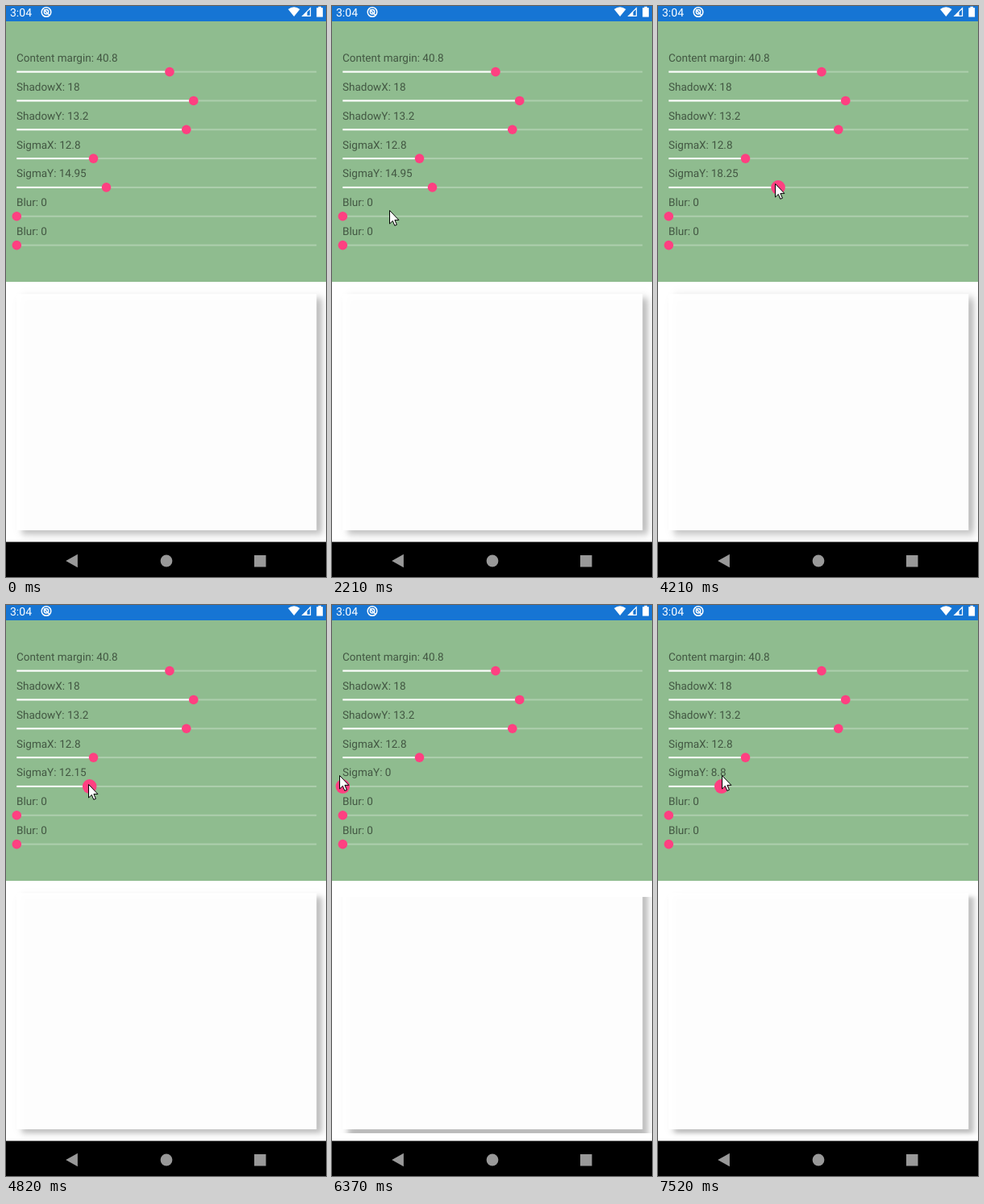
Animation, 397 px wide and 708 px high, one loop 8000 ms. Source, as an HTML page with a canvas:

```html
<!DOCTYPE html>
<html lang="en">
<head>
<meta charset="utf-8">
<title>Shadow settings</title>
<style>
html, body { margin: 0; width: 100%; height: 100%; overflow: hidden; background: #fff; }
canvas { display: block; }
</style>
</head>
<body>
<canvas id="stage" width="397" height="708"></canvas>
<script>
const ctx = document.getElementById('stage').getContext('2d');
const LOOP = 8000, TICK = 77.06, START = 424;
const LEFT = 13.3, RIGHT = 385.2, FIRST_ROW = 81.6, ROW = 35.83;
const PINK = '#ff4081', GREEN = '#8fbc8f', BLUE = '#1675d4', GRAY = '#999';
const CARD = { x: 13.1, y: 357.1, r: 385.3, b: 650.1 };
const VIEW = { y: 342, w: 397, h: 323 };
const PX = 0.3676, BLUR = 0.31;

const sliders = [
  { name: 'Content margin', value: 40.8, min: 0, max: 80 },
  { name: 'ShadowX', value: 18, min: -100, max: 100 },
  { name: 'ShadowY', value: 13.2, min: -100, max: 100 },
  { name: 'SigmaX', value: 12.8, min: 0, max: 50 },
  { name: 'SigmaY', value: 14.95, min: 0, max: 50 },
  { name: 'Blur', value: 0, min: 0, max: 50 },
  { name: 'Blur', value: 0, min: 0, max: 50 }
];
const [, shadowX, shadowY, sigmaX, sigmaY] = sliders;

// Key points: tick, pointer x, pointer y (and slider value while dragging)
const hover = [
  [0, 271, 504], [1, 271, 464], [2, 271, 464], [8, 168, 207],
  [10, 130, 187], [12, 67, 265], [19, 14, 286], [27, 127, 220]
];
const drag = [
  [42, 126, 219, 14.95], [47, 156, 219, 19.75], [57, 102, 222, 12.15],
  [67, 65, 220, 7.65], [77, 9, 211, 0], [81, 9, 211, 0], [92, 79, 211, 8.8]
];
const HIDE = 30, SHOW = 40, PRESS = 42;

function along(path, k) {
  const i = path.findIndex(p => p[0] >= k);
  if (i < 0) return path[path.length - 1];
  if (i === 0) return path[0];
  const a = path[i - 1], b = path[i], u = (k - a[0]) / (b[0] - a[0]);
  return a.map((v, j) => v + (b[j] - v) * u);
}

function rect(x, y, w, h, fill) {
  ctx.fillStyle = fill;
  ctx.fillRect(x, y, w, h);
}

function disc(x, y, r, fill) {
  ctx.fillStyle = fill;
  ctx.beginPath();
  ctx.arc(x, y, r, 0, 7);
  ctx.fill();
}

function ring(x, y, r) {
  ctx.beginPath();
  ctx.arc(x, y, r, 0, 7);
  ctx.stroke();
}

function poly(points, fill) {
  ctx.fillStyle = fill;
  ctx.beginPath();
  points.forEach(([x, y]) => ctx.lineTo(x, y));
  ctx.closePath();
  ctx.fill();
}

function text(str, x, y, size, fill) {
  ctx.font = size + 'px Roboto, sans-serif';
  ctx.textRendering = 'geometricPrecision';
  ctx.fillStyle = fill;
  ctx.fillText(str, x, y);
}

// Soft step: logistic fit of the Gaussian, or pixel coverage without blur
function step(d, sigma) {
  if (sigma < 0.05) return Math.min(1, Math.max(0, d + 0.5));
  return 1 / (1 + Math.exp(-1.702 * d / sigma));
}

function profile(n, from, a, b, sigma) {
  return Array.from({ length: n }, (_, i) => {
    const p = from + i + 0.5;
    return step(p - a, sigma) * step(b - p, sigma);
  });
}

const image = ctx.createImageData(VIEW.w, VIEW.h);
const cardX = profile(VIEW.w, 0, CARD.x, CARD.r, 0);
const cardY = profile(VIEW.h, VIEW.y, CARD.y, CARD.b, 0);
let drawnSigma = null;

function drawCard() {
  if (sigmaY.value !== drawnSigma) {
    drawnSigma = sigmaY.value;
    const dx = shadowX.value * PX, dy = shadowY.value * PX;
    const across = profile(VIEW.w, 0, CARD.x + dx, CARD.r + dx, sigmaX.value * BLUR);
    const down = profile(VIEW.h, VIEW.y, CARD.y + dy, CARD.b + dy, sigmaY.value * BLUR);
    for (let y = 0, i = 0; y < VIEW.h; y++) {
      for (let x = 0; x < VIEW.w; x++, i += 4) {
        const seen = 1 - 0.97 * cardX[x] * cardY[y];
        image.data.fill(255 - 68 * across[x] * down[y] * seen, i, i + 3);
        image.data[i + 3] = 255;
      }
    }
  }
  ctx.putImageData(image, 0, VIEW.y);
}

function drawStatus() {
  rect(0, 0, 397, 19, BLUE);
  text('3:04', 5, 13, 14, '#fff');

  ctx.strokeStyle = '#fff';
  ctx.lineWidth = 1.5;
  ring(50, 7.5, 5.8);
  ring(50, 7.2, 2.7);
  ctx.beginPath();
  ctx.moveTo(47, 4.5);
  ctx.lineTo(54, 11.5);
  ctx.stroke();

  ctx.fillStyle = '#fff';
  ctx.beginPath();
  ctx.moveTo(357.3, 13);
  ctx.lineTo(350, 3.9);
  ctx.quadraticCurveTo(357.3, -1.2, 364.6, 3.9);
  ctx.fill();

  poly([[366.5, 13], [378.2, 13], [378.2, 1.3]], '#fff');
  poly([[373.6, 11.8], [377, 11.8], [377, 4.2], [373.6, 7.6]], BLUE);

  rect(385.3, 2.2, 7.8, 11.4, '#fff');
  rect(387.4, 0.8, 3.6, 2, '#fff');
}

function drawSliders(pressed) {
  rect(0, 19, 397, 323, GREEN);
  sliders.forEach((s, i) => {
    const y = FIRST_ROW + ROW * i;
    const x = LEFT + (RIGHT - LEFT) * (s.value - s.min) / (s.max - s.min);
    text(s.name + ': ' + s.value, 13, Math.round(y - 12.5), 13.5, 'rgba(0,0,0,.54)');
    rect(LEFT, y - 1, RIGHT - LEFT, 2, 'rgba(255,255,255,.27)');
    rect(LEFT, y - 1, x - LEFT, 2, '#fff');
    disc(x, y, pressed && s === sigmaY ? 8.8 : 5.8, PINK);
  });
}

function drawNav() {
  rect(0, 664.5, 397, 44, '#000');
  poly([[74.2, 688], [88.9, 679.8], [88.9, 696.2]], GRAY);
  disc(199, 688, 7.4, GRAY);
  rect(308, 681, 14.5, 14.5, GRAY);
}

function drawPointer(x, y) {
  ctx.save();
  ctx.translate(x + 0.5, y + 0.5);
  poly([[0, 0], [0, 16.5], [3.8, 12.9], [6.3, 18.8], [8.9, 17.7], [6.4, 11.9], [11.4, 11.9]], '#fff');
  ctx.strokeStyle = '#000';
  ctx.lineWidth = 1;
  ctx.stroke();
  ctx.restore();
}

function draw(now) {
  const k = Math.floor((now % LOOP - START) / TICK);
  const [, dragX, dragY, value] = along(drag, k);
  sigmaY.value = +(Math.round(value * 20) / 20).toFixed(2);
  drawCard();
  drawSliders(k >= PRESS);
  drawStatus();
  drawNav();

  if (k >= PRESS) {
    drawPointer(Math.round(dragX), Math.round(dragY));
  } else if (k >= SHOW) {
    drawPointer(136 - 5 * (k - SHOW), 219);
  } else if (k >= 0 && k < HIDE) {
    const [, x, y] = along(hover, k);
    drawPointer(Math.round(x), Math.round(y));
  }
}

const begin = performance.now();
function loop() {
  draw(performance.now() - begin);
  requestAnimationFrame(loop);
}
loop();
</script>
</body>
</html>
```
